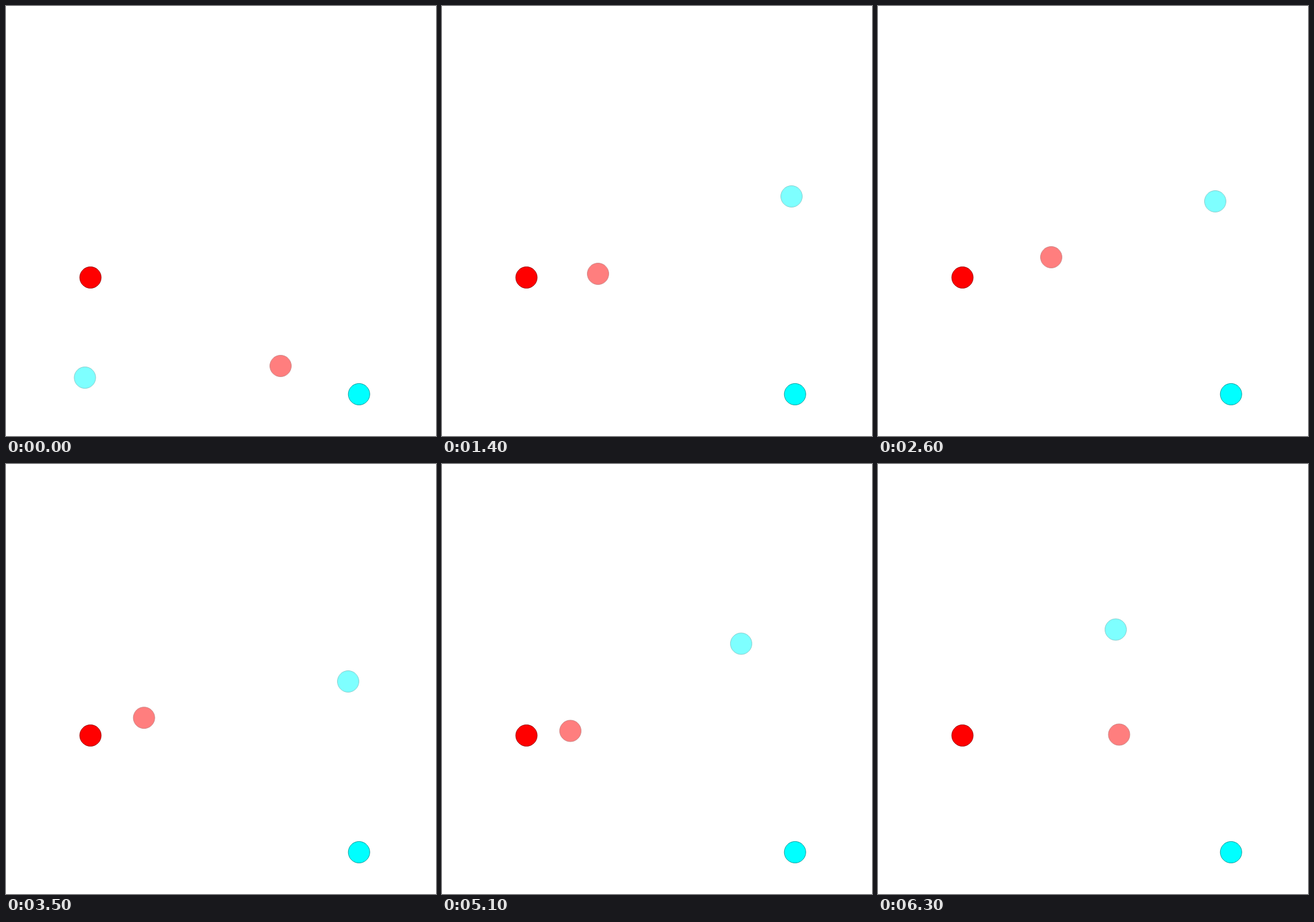
An HTML page for the animation above (6400 ms loop, 700 px wide and 700 px high).

```html
<!DOCTYPE html>
<html lang="en">
<head>
<meta charset="utf-8">
<title>Four discs</title>
<style>
  html, body { margin: 0; width: 100%; height: 100%; overflow: hidden; background: #fff; }
  svg { display: block; width: 100vw; height: 100vh; }
  circle { stroke-width: .8; }
  .red { fill: #f00; stroke: #800; }
  .cyan { fill: #0ff; stroke: #088; }
  .pale { opacity: .5; }
</style>
</head>
<body>
<svg viewBox="0 0 700 700">
  <circle class="red" r="17.5" cx="137.5" cy="442"/>
  <circle class="cyan" r="17.5" cx="574.7" cy="632"/>
  <circle class="red pale" id="red" r="17.5"/>
  <circle class="cyan pale" id="cyan" r="17.5"/>
</svg>
<script>
const STEP = 100, STEPS = 64;

// Key points: [step, x, y]
const paths = {
  red: [
    [0, 447, 586], [6, 448, 327.5], [12, 142, 440], [14, 254, 436],
    [20, 139, 442], [26, 282, 409], [31, 141, 435], [38, 279, 399],
    [43, 234, 410.5], [47, 140, 419], [51, 209, 434.5], [57, 262, 488],
    [63, 392.5, 440.5]
  ],
  cyan: [
    [0, 128.5, 605], [6, 406.5, 377.5], [11, 589, 314], [14, 569, 310],
    [26, 549, 318], [35, 557, 354], [43, 536.5, 387.5], [51, 487, 292.5],
    [59, 432, 242], [63, 387, 269.5]
  ]
};

const chord = (a, b, axis) => (b[axis] - a[axis]) / (b[0] - a[0]);

// Slope at a key point: flat at turns, otherwise the harmonic mean of both chords
function slope(prev, point, next, axis) {
  if (!prev) return chord(point, next, axis);
  if (!next) return chord(prev, point, axis);
  const d0 = chord(prev, point, axis), d1 = chord(point, next, axis);
  return d0 * d1 > 0 ? 2 * d0 * d1 / (d0 + d1) : 0;
}

// Cubic curve through the key points
function at(path, step, axis) {
  const i = path.findIndex((p, k) => k > 0 && step <= p[0]);
  const a = path[i - 1], b = path[i], h = b[0] - a[0];
  const u = (step - a[0]) / h, v = 1 - u;
  const sa = slope(path[i - 2], a, b, axis), sb = slope(a, b, path[i + 1], axis);
  return v * v * (1 + 2 * u) * a[axis] + u * u * (1 + 2 * v) * b[axis]
    + h * u * v * (v * sa - u * sb);
}

const start = performance.now();

function draw(now) {
  const step = Math.floor(Math.max(0, now - start) / STEP) % STEPS;
  for (const [id, path] of Object.entries(paths)) {
    const disc = document.getElementById(id);
    disc.setAttribute('cx', at(path, step, 1));
    disc.setAttribute('cy', at(path, step, 2));
  }
  requestAnimationFrame(draw);
}
draw(start);
</script>
</body>
</html>
```
